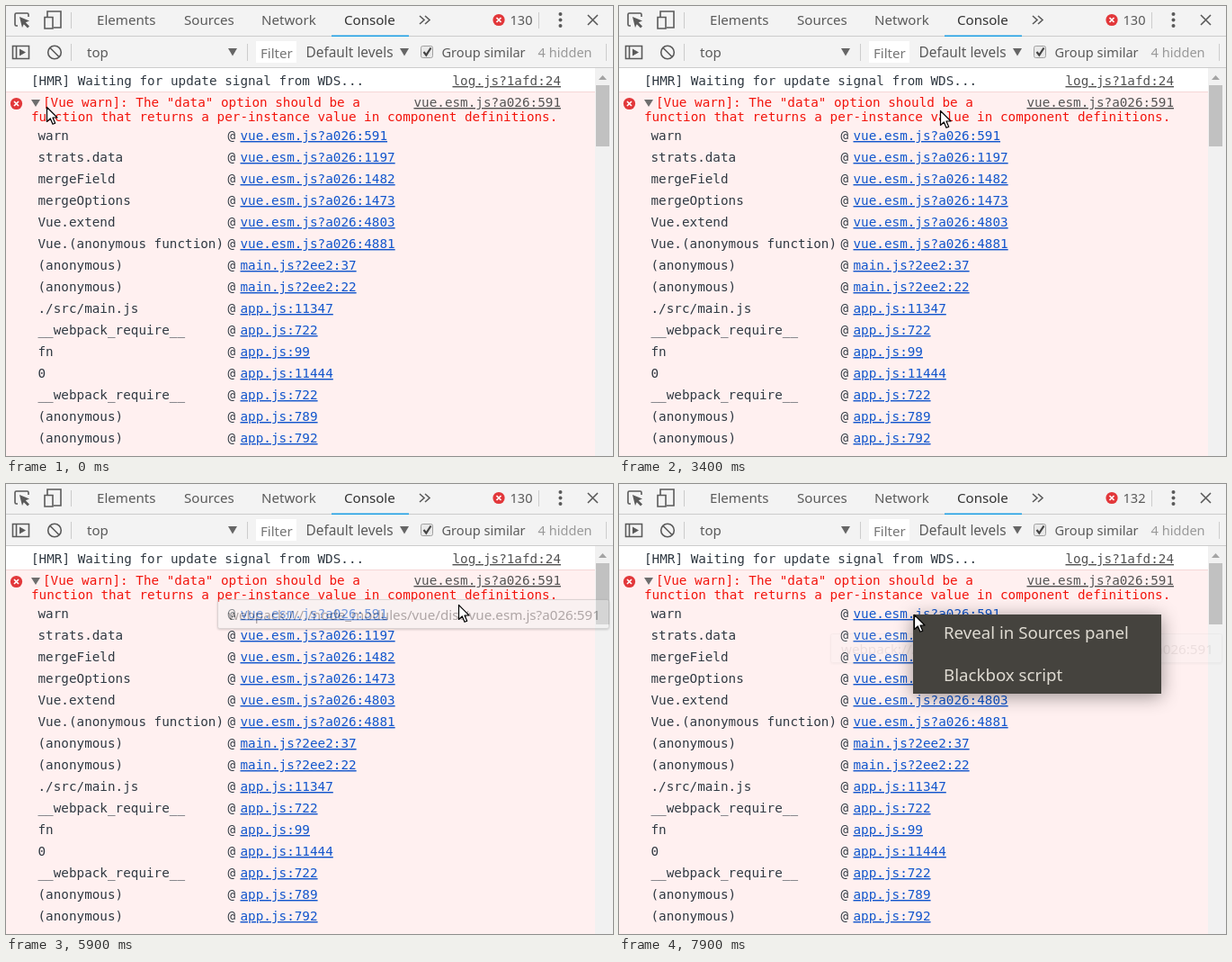
These frames come from a looping animation (675 by 500 pixels, 8 s). An HTML page:

```html
<!DOCTYPE html>
<html lang="en">
<head>
<meta charset="utf-8">
<title>Console</title>
<style>
html, body { margin: 0; width: 100%; height: 100%; overflow: hidden; background: #fff; }
svg { display: block; width: 100%; height: 100%; }
text { font: 15.1px "Noto Sans", "Open Sans", sans-serif; fill: #5a5a5a; white-space: pre; }
.s { font-size: 14.6px; }
.mono text { font: 14.3px "DejaVu Sans Mono", monospace; fill: #303942; }
.mono .red { fill: #f2140c; }
.mono .link, .mono .origin { text-decoration: underline 1px; }
.mono .link { fill: #15c; }
.mono .origin { fill: #545454; }
.line { fill: none; stroke: #5a5a5a; stroke-width: 1.6; }
.sep { fill: none; stroke: #ccc; }
#tip rect { fill: #f3f3f3; stroke: #adadad; filter: drop-shadow(0 1px 1px #0006); }
#tip text { font-size: 15.2px; fill: #404040; }
#menu rect { fill: #45433e; filter: drop-shadow(0 3px 10px #0006); }
#menu text { font-size: 18.7px; fill: #dfdbd2; }
.cursor { fill: #fff; stroke: #000; stroke-width: 1.2; stroke-linejoin: round; }
</style>
</head>
<body>
<svg viewBox="0 0 675 500">
  <defs>
    <g id="error">
      <circle r="6.6" fill="#e2373a"/>
      <path d="M-2.5-2.5L2.5 2.5M2.5-2.5L-2.5 2.5" stroke="#fff" stroke-width="1.7"/>
    </g>
    <path id="down" d="M0 0H10L5 8.5Z" fill="#666"/>
    <circle id="dot" r="2" fill="#5a5a5a"/>
  </defs>

  <rect width="675" height="68" fill="#f3f3f3"/>
  <path class="sep" d="M0 33.5H675M0 68.5H675M72.5 7V25M592.5 7V25M72.5 42V61M268.5 42V61M667.5 42V61"/>
  <rect x="362" y="32.5" width="86" height="1.5" fill="#1a9de3"/>

  <path class="line" d="M13 22H11.5Q10 22 10 20.5V9.5Q10 8 11.5 8H23.5Q25 8 25 9.5V12"/>
  <path d="M15 12L26 16.5L21.8 18.3L26 22.5L24 24.5L19.8 20.3L18 24Z" fill="#5a5a5a"/>
  <path class="line" d="M46 12V6H61V24H53M43 12.5H52V25H43Z"/>
  <path class="line" d="M460 11L465 15.5L460 20M466 11L471 15.5L466 20"/>
  <use href="#error" x="548" y="15.5"/>
  <use href="#dot" x="616.5" y="9"/>
  <use href="#dot" x="616.5" y="15.5"/>
  <use href="#dot" x="616.5" y="22"/>
  <path class="line" d="M647 10L658 21M658 10L647 21"/>
  <text x="101" y="21">Elements</text>
  <text x="198" y="21">Sources</text>
  <text x="284" y="21">Network</text>
  <text x="376" y="21" style="fill:#333">Console</text>
  <text id="count" class="s" x="560.5" y="21"></text>

  <path class="line" d="M7.5 44.5H25.5V58.5H7.5ZM11.5 44V59"/>
  <path d="M15 47.5L22 51.5L15 55.5Z" fill="#5a5a5a"/>
  <circle class="line" cx="54" cy="51.5" r="7.3"/>
  <path class="line" d="M49 46.5L59 56.5"/>
  <use href="#down" x="247" y="47"/>
  <use href="#down" x="438" y="47"/>
  <rect x="278" y="39" width="45" height="24" fill="#fff"/>
  <text x="90" y="57">top</text>
  <svg x="278" y="39" width="41" height="24"><text x="5" y="18.5" style="fill:#757575">Filter</text></svg>
  <text x="333.5" y="57" style="font-size:15.4px">Default levels</text>
  <rect x="461.5" y="44.5" width="13" height="13" rx="2" fill="#e9e9e9" stroke="#a0a0a0"/>
  <path d="M464.5 51L467.3 54.5L472.5 46.5" fill="none" stroke="#444" stroke-width="2.2"/>
  <text class="s" x="484.5" y="57">Group similar</text>
  <text class="s" x="591.5" y="57" style="fill:#999">4 hidden</text>

  <rect y="69" width="655" height="26" fill="#fff"/>
  <rect y="95" width="655" height="405" fill="#fff0f0"/>
  <path d="M0 95.5H655" stroke="#f5d6d6"/>
  <rect x="655" y="69" width="20" height="431" fill="#f1f1f1"/>
  <rect x="656" y="88" width="15" height="68" fill="#c1c1c1"/>
  <path d="M659 82L663.5 77L668 82Z" fill="#a3a3a3"/>
  <use href="#error" x="11.5" y="108.5"/>
  <path d="M28 104H38L33 112Z" fill="#6e6e6e"/>
  <g class="mono" id="log">
    <text x="28" y="88">[HMR] Waiting for update signal from WDS...</text>
    <text class="origin" x="617" y="88" text-anchor="end">log.js?1afd:24</text>
    <text class="red" x="41" y="112">[Vue warn]: The "data" option should be a</text>
    <text class="red" x="28" y="128">function that returns a per-instance value in component definitions.</text>
    <text class="origin" id="origin" x="617" y="112" text-anchor="end">vue.esm.js?a026:591</text>
  </g>

  <g id="tip">
    <rect x="235.5" y="128.5" width="435" height="32" rx="2"/>
    <text x="247" y="150.5">webpack:///./node_modules/vue/dist/vue.esm.js?a026:591</text>
  </g>
  <g id="menu">
    <rect x="327" y="145" width="276" height="88"/>
    <text x="361" y="172">Reveal in Sources panel</text>
    <text x="361" y="219">Blackbox script</text>
  </g>
  <path class="cursor" id="arrow" d="M.5 .5V16.5L4.3 13L7 19.3L9.7 18.2L7 12H12Z"/>
  <g class="cursor" id="hand">
    <path d="M-3 8V2Q-3 .5 -1.5 .5T0 2V6L6.500 7Q8.500 7.500 8.300 10L7 14.500V17.500H-3V15L-7 10Q-7 8 -5 8.700L-3 10.500Z"/>
    <path d="M0 11V13M2.500 11V13M5 11V13" stroke-width="1"/>
  </g>
</svg>
<script>
const $ = id => document.getElementById(id);

const calls = `warn|vue.esm.js?a026:591
strats.data|vue.esm.js?a026:1197
mergeField|vue.esm.js?a026:1482
mergeOptions|vue.esm.js?a026:1473
Vue.extend|vue.esm.js?a026:4803
Vue.(anonymous function)|vue.esm.js?a026:4881
(anonymous)|main.js?2ee2:37
(anonymous)|main.js?2ee2:22
./src/main.js|app.js:11347
__webpack_require__|app.js:722
fn|app.js:99
0|app.js:11444
__webpack_require__|app.js:722
(anonymous)|app.js:789
(anonymous)|app.js:792`.split("\n");

$("log").innerHTML += calls.map((call, i) => {
  const [name, file] = call.split("|"), y = 149 + 24 * i;
  return `<text x="35.5" y="${y}">${name}</text><text x="246.5" y="${y}">@</text>` +
    `<text class="link" x="260.5" y="${y}">${file}</text>`;
}).join("");

// Each move: start and length in ms, then the point it eases to.
const moves = [
  [1000, 500, 121, 113], [2000, 400, 211, 113], [2900, 500, 357, 116], [3400, 400, 407, 118],
  [3800, 500, 518, 106], [4700, 200, 559, 107], [4900, 300, 503, 109], [5300, 600, 503, 134],
  [5900, 300, 460, 182], [6200, 900, 393, 147], [7100, 200, 361, 143], [7300, 200, 328, 145]
];

// Smooth rise from 0 to 1.
function ramp(t, start, length) {
  const p = Math.min(1, Math.max(0, (t - start) / length));
  return p * p * (3 - 2 * p);
}

function pointer(t) {
  let x = 45, y = 112;
  for (const [start, length, toX, toY] of moves) {
    const p = ramp(t, start, length);
    x += (toX - x) * p;
    y += (toY - y) * p;
  }
  return [Math.round(x), Math.round(y)];
}

const show = (id, on) => $(id).setAttribute("visibility", on ? "visible" : "hidden");
const move = (id, x, y) => $(id).setAttribute("transform", `translate(${x} ${y})`);

function draw() {
  const t = Math.floor(performance.now() % 8000 / 100) * 100;
  const [x, y] = pointer(t);
  const menu = t >= 7700;
  const onOrigin = x >= 454 && x <= 617 && y > 99 && y < 116;
  const onCall = x >= 260 && x <= 424 && y > 137 && y < 153;
  const hand = !menu && (onOrigin || onCall);
  move("arrow", x, y);
  move("hand", x, y);
  show("arrow", !hand);
  show("hand", hand);
  show("menu", menu);
  $("origin").style.fill = onOrigin ? "#111" : "";
  move("tip", 0, t < 6500 ? 0 : 38);
  $("tip").setAttribute("opacity",
    ramp(t, 4300, 400) - ramp(t, 5650, 450) + ramp(t, 7100, 250) - ramp(t, 7600, 370));
  $("count").textContent = t < 6700 ? 130 : 132;
  requestAnimationFrame(draw);
}
draw();
</script>
</body>
</html>
```
